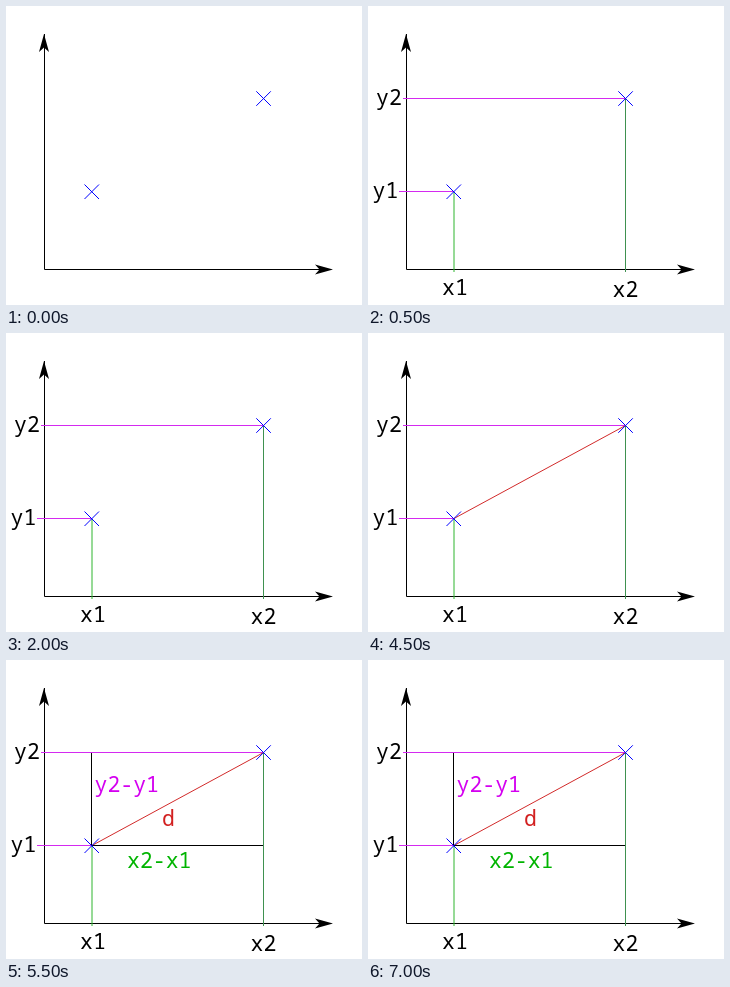
An HTML page that plays this animation: 356x299 px, repeating every 8000 ms.

```html
<!DOCTYPE html>
<html lang="en">
<head>
<meta charset="utf-8">
<title>Distance between two points</title>
<style>
  html, body { margin: 0; width: 100%; height: 100%; overflow: hidden; background: #fff; }
  svg { display: block; width: 356px; height: 299px; }
  path { fill: none; stroke-width: 1; }
  text { font: 21.5px "Noto Sans Mono", "DejaVu Sans Mono", monospace; }
  .axis, .leg { stroke: #000; }
  .head { fill: #000; }
  .mark { stroke: #00f; }
  .across { stroke: #d42af0; }
  .up { stroke: #2fb52f; }
  .up.far { stroke: #3f9150; }
  .link { stroke: #d22a2a; }
</style>
</head>
<body>
<svg viewBox="0 0 356 299">
  <path class="axis" d="M38.5 28V263.5H320"/>
  <path class="head" d="M38 28L43 46L38 41.5L33 46Z"/>
  <path class="head" d="M327 263.5L309 268.5L313.5 263.5L309 258.5Z"/>

  <g data-from="500">
    <path class="across" d="M35 92.5H257.5M31 185.5H86"/>
    <path class="up" d="M86 186V266"/>
    <path class="up far" d="M257.5 92.5V266"/>
    <text x="8" y="99">y2</text>
    <text x="4.5" y="192">y1</text>
    <text x="74" y="289">x1</text>
    <text x="244.5" y="291">x2</text>
  </g>

  <path class="link" data-from="3000" d="M86 185.5L257.5 92.5"/>

  <g data-from="5500">
    <path class="leg" d="M85.5 93V185.5H257"/>
    <text x="88.5" y="132" fill="#d400f0">y2-y1</text>
    <text x="156" y="165.5" fill="#d22020">d</text>
    <text x="121" y="208" fill="#00b400">x2-x1</text>
  </g>

  <path class="mark" d="M78.5 178.5l14.5 14.5m0 -14.5l-14.5 14.5"/>
  <path class="mark" d="M250.3 85.3l14.5 14.5m0 -14.5l-14.5 14.5"/>
</svg>
<script>
  const LOOP = 8000;
  const steps = [...document.querySelectorAll("[data-from]")];
  const start = performance.now();

  function draw(time) {
    for (const step of steps) {
      step.setAttribute("visibility", time >= +step.dataset.from ? "visible" : "hidden");
    }
  }

  function tick() {
    draw((performance.now() - start) % LOOP);
    requestAnimationFrame(tick);
  }
  tick();
</script>
</body>
</html>
```
